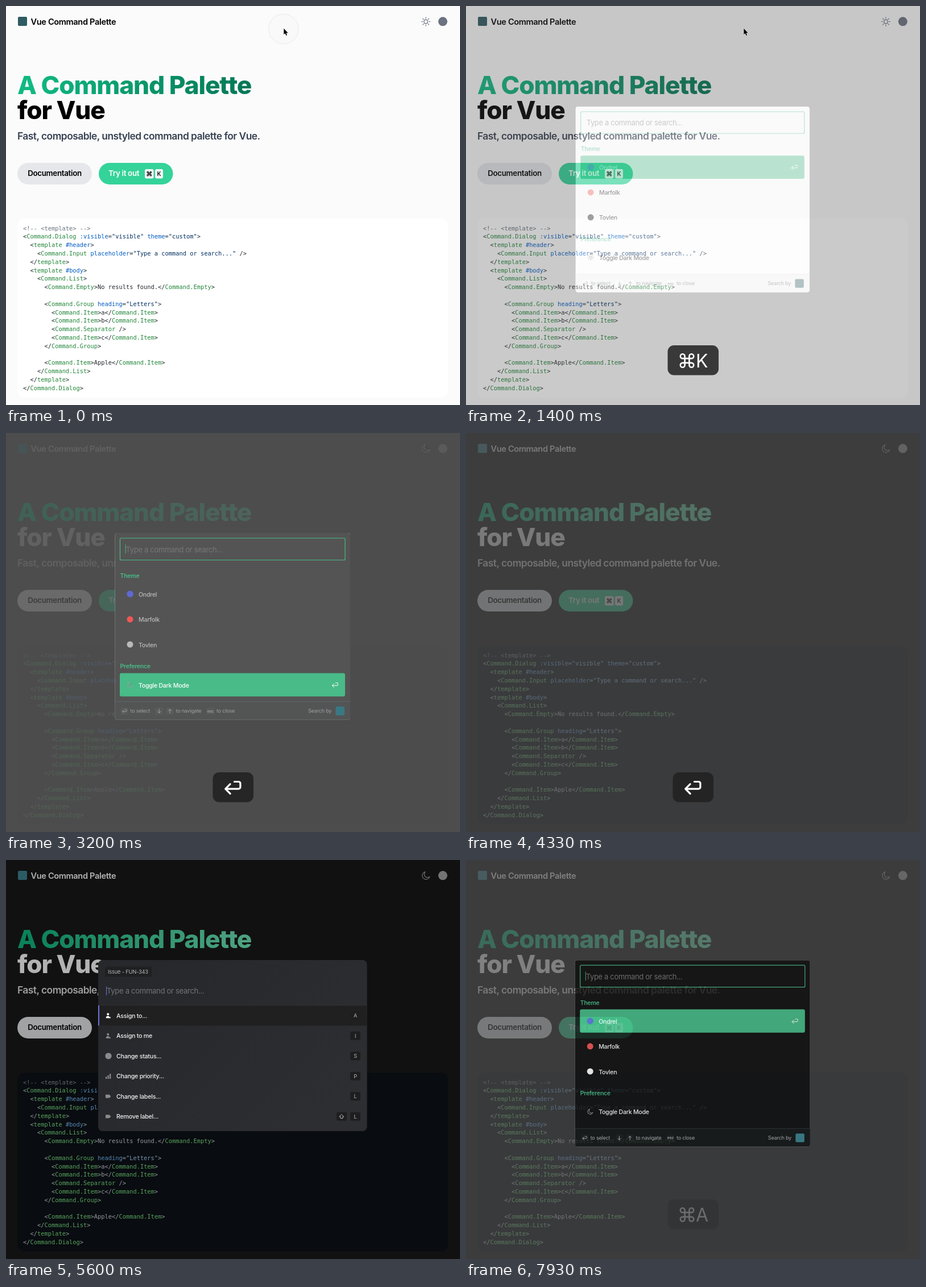
An HTML page that plays this animation: 798 by 702 pixels, repeating every 8000 ms.

```html
<!DOCTYPE html>
<html lang="en">
<head>
<meta charset="utf-8">
<title>Vue Command Palette</title>
<style>
html, body { margin: 0; width: 100%; height: 100%; overflow: hidden; }
svg { display: block; }
text { font-family: Inter, "Open Sans", sans-serif; letter-spacing: -.025em; white-space: pre; }
.code text { font: 10.37px "DejaVu Sans Mono", monospace; letter-spacing: 0; }
.light {
  --bg: #fbfbfb; --panel: #fff; --ink: #000; --sub: #374151; --icon: #6b7280; --logo: #2f5b63; --h1: url(#h1-light);
  --code: #24292e; --comment: #6a737d; --string: #032f62; --tag: #22863a; --attr: #005cc5;
  --dialog: #fafafa; --foot: #ececec; --line: #dedede; --key: #f5f5f5; --hint: #5f6368;
}
.dark {
  --bg: #181818; --panel: #0d1117; --ink: #fff; --sub: #e2e2e2; --icon: #a6a6a6; --logo: #3d8490; --h1: url(#h1-dark);
  --code: #d5dae0; --comment: #8b949e; --string: #a5d6ff; --tag: #7ee787; --attr: #79c0ff;
  --dialog: #161616; --foot: #1a1d1d; --line: #2f3a3a; --key: #1f2222; --hint: #b5b5b5;
}
</style>
</head>
<body>
<svg id="stage" width="798" height="702" viewBox="0 0 798 702"></svg>
<script>
const GREEN = '#48bb88';
const CMD = 'M6-9a3 3 0 0 0-3 3V6a3 3 0 1 0 3-3H-6a3 3 0 1 0 3 3V-6a3 3 0 1 0-3 3H6a3 3 0 1 0 0-6z';
const ENTER = 'M2-10h7a3 3 0 0 1 3 3v6a3 3 0 0 1-3 3h-22m8-8l-8 8 8 8';
const UP = 'M0 11V-11m-9 9l9-9 9 9';
const DOWN = 'M0-11V11m-9-9l9 9 9-9';
const SHIFT = 'M0-10L10 0H5v8H-5V0h-5z';
const MOON = 'M-1-7A7 7 0 1 0 7 2A6 6 0 0 1-1-7z';
const SUN = 'M3.5 0a3.5 3.5 0 1 1-7 0a3.5 3.5 0 1 1 7 0' + [...Array(8)].map((_, i) => {
  const c = Math.cos(i * Math.PI / 4), s = Math.sin(i * Math.PI / 4);
  return `M${c * 5.8} ${s * 5.8}L${c * 8} ${s * 8}`;
}).join('');

const text = (x, y, str, size, weight, fill, more = '') =>
  `<text x="${x}" y="${y}" font-size="${size}" font-weight="${weight}" fill="${fill}" ${more}>${str}</text>`;
const mid = (x, y, str, size, weight, fill) => text(x, y, str, size, weight, fill, 'text-anchor="middle"');
const rect = (x, y, w, h, r, fill, more = '') =>
  `<rect x="${x}" y="${y}" width="${w}" height="${h}" rx="${r}" fill="${fill}" ${more}/>`;
const dot = (x, y, r, fill) => `<circle cx="${x}" cy="${y}" r="${r}" fill="${fill}"/>`;
const icon = (d, x, y, scale, stroke, width) =>
  `<path d="${d}" transform="translate(${x} ${y}) scale(${scale})" fill="none" stroke="${stroke}"
    stroke-width="${width / scale}" stroke-linecap="round" stroke-linejoin="round"/>`;
const hole = (x, y, w, h, r, fill, opacity) =>
  `<path fill-rule="evenodd" fill="${fill}" fill-opacity="${opacity}" d="M-60-60H860V760H-60z
    M${x + r} ${y}h${w - 2 * r}a${r} ${r} 0 0 1 ${r} ${r}v${h - 2 * r}a${r} ${r} 0 0 1-${r} ${r}
    h${2 * r - w}a${r} ${r} 0 0 1-${r}-${r}v${2 * r - h}a${r} ${r} 0 0 1 ${r}-${r}z"/>`;

const source = `<!-- <template> -->
<Command.Dialog :visible="visible" theme="custom">
  <template #header>
    <Command.Input placeholder="Type a command or search..." />
  </template>
  <template #body>
    <Command.List>
      <Command.Empty>No results found.</Command.Empty>

      <Command.Group heading="Letters">
        <Command.Item>a</Command.Item>
        <Command.Item>b</Command.Item>
        <Command.Separator />
        <Command.Item>c</Command.Item>
      </Command.Group>

      <Command.Item>Apple</Command.Item>
    </Command.List>
  </template>
</Command.Dialog>`;

const escape = s => s.replace(/</g, '&lt;').replace(/>/g, '&gt;');
const TOKEN = /(<!--.*-->)|("[^"]*")|((?<=<\/?)[\w.]+)|((?<= )[:#]?\w+(?=[=>]))|[<>]/g;
const highlight = line => line.replace(TOKEN, (m, comment, string, tag, attr) => {
  const kind = comment ? 'comment' : string ? 'string' : tag ? 'tag' : attr ? 'attr' : 'code';
  return `<tspan fill="var(--${kind})">${escape(m)}</tspan>`;
});

const page = theme => `
  ${rect(0, 0, 798, 702, 0, 'var(--bg)')}
  ${rect(21, 19, 16, 16, 2, 'var(--logo)')}
  ${text(43.5, 32.5, 'Vue Command Palette', 14.6, 600, 'var(--ink)')}
  ${icon(theme == 'dark' ? MOON : SUN, 738, 27.5, .95, 'var(--icon)', 1.2)}
  ${dot(767.8, 27.3, 8, 'var(--icon)')}
  ${text(20, 155, 'A Command Palette', 44.2, 800, 'var(--h1)')}
  ${text(20, 199.3, 'for Vue', 44.2, 800, 'var(--ink)')}
  ${text(20, 235, 'Fast, composable, unstyled command palette for Vue.', 17.4, 600, 'var(--sub)', 'style="letter-spacing:-.03em"')}
  ${rect(20, 276, 131, 38, 19, '#e5e7eb')}
  ${mid(85.5, 299.4, 'Documentation', 13.4, 600, '#000')}
  ${rect(163, 276, 130.5, 38, 19, '#34d399')}
  ${text(180, 299.4, 'Try it out', 13.4, 600, '#fff')}
  ${rect(244, 287, 15.5, 16.5, 3, '#f7f7f7')}${icon(CMD, 251.8, 295.2, .42, '#111', 1.2)}
  ${rect(262, 287, 14, 16.5, 3, '#f7f7f7')}${mid(269, 298.8, 'K', 10, 600, '#111')}
  ${rect(20, 374, 757, 315, 13, 'var(--panel)')}
  <g class="code">${source.split('\n').map((line, i) =>
    text(30, 394.6 + i * 14.79, highlight(line), 10.37, 400, 'var(--code)')).join('')}</g>`;

const menu = (y, label, mark, name) => `
  <g data-row="${name}">${rect(200, y - 20.5, 396, 41, 3, GREEN)}${icon(ENTER, 578.5, y + .5, .4, '#fff', 1)}</g>
  ${mark}<text data-label="${name}" x="233" y="${y + 4.6}" font-size="10.6" font-weight="500" fill="var(--ink)">${label}</text>`;

const keycap = (x, d) => rect(x - 7, 483, 14, 12.5, 2, 'var(--key)') + icon(d, x, 489.3, .3, 'var(--hint)', 1);
const hint = (x, str) => text(x, 492.3, str, 9.1, 400, 'var(--hint)');

const palette = theme => `
  ${rect(191.5, 176, 413.5, 328.5, 4, 'var(--dialog)')}
  ${rect(200.5, 185, 395.5, 38.5, 2, 'none', `stroke="${GREEN}" stroke-width="1.2"`)}
  ${text(210.5, 209.5, 'Type a command or search...', 13, 400, '#787878')}
  <rect class="caret" x="209.6" y="196.5" width="1" height="15.5" fill="${GREEN}"/>
  ${text(200.5, 254.6, 'Theme', 10.5, 600, GREEN)}
  ${menu(283.2, 'Ondrel', dot(218, 283.2, 5.8, '#5e6ad2'), 'first')}
  ${menu(327.8, 'Marfolk', dot(218, 327.8, 5.5, '#f25757'), '')}
  ${menu(372, 'Tovlen', dot(218, 372, 5.5, 'var(--ink)'), '')}
  ${text(200.5, 414, 'Preference', 10.5, 600, GREEN)}
  ${menu(443, 'Toggle Dark Mode', icon(theme == 'dark' ? MOON : SUN, 218, 443, .66, 'var(--icon)', 1), 'last')}
  <path d="M191.5 472.5h413.5v28a4 4 0 0 1-4 4h-405.500a4 4 0 0 1-4-4z" fill="var(--foot)"/>
  ${rect(191.5, 472, 413.5, 1, 0, 'var(--line)')}
  ${keycap(208.5, ENTER)}${hint(218.5, 'to select')}
  ${keycap(269.3, DOWN)}${keycap(288, UP)}${hint(298.5, 'to navigate')}
  ${rect(352.5, 483, 14, 12.5, 2, 'var(--key)')}${mid(359.5, 491.5, 'esc', 7, 600, 'var(--hint)')}
  ${hint(370, 'to close')}${hint(531, 'Search by')}
  ${rect(579.5, 481.3, 15.5, 15.5, 2, 'var(--logo)')}`;

const person = (y, c) => dot(179.2, y - 2.6, 2, c) +
  `<path d="M175.800 ${y + 4.500}v-1.500a3 3 0 0 1 3-2.500h1.500l1.500 2h2v2z" fill="${c}"/>`;
const label = (y, c) => `<path d="M175 ${y - 3}h6.500l3 3-3 3H175z" fill="${c}"/>`;
const bars = (y, c) => [0, 1, 2].map(i => rect(175 + i * 3.5, y + 1 - i * 2.6, 2.3, 3.6 + i * 2.6, .5, c)).join('');
const shortcut = (x, y, str) => rect(x - 9, y - 7.6, 18, 15, 3, '#1e1e20') +
  (str == 'shift' ? icon(SHIFT, x, y + .3, .38, '#b5b5b5', 1) : mid(x, y + 3.2, str, 9.2, 400, '#b5b5b5'));

const issueRows = [
  ['Assign to...', 'A', person], ['Assign to me', 'I', person],
  ['Change status...', 'S', (y, c) => dot(180, y, 5.6, c)], ['Change priority...', 'P', bars],
  ['Change labels...', 'L', label], ['Remove label...', 'L', label]];

const issueDialog = `
  ${hole(162, 176, 472.5, 301, 8, '#000', .3)}
  ${rect(162, 176, 472.5, 301, 8, 'url(#slate)')}
  ${rect(174, 187.5, 82, 18, 3, '#1f2022')}
  ${text(179, 200, 'Issue - FUN-343', 9.4, 400, '#b4b4b6')}
  ${text(177, 235, 'Type a command or search...', 13.1, 400, '#727477')}
  <rect class="caret" x="176" y="222.500" width="1.200" height="15.500" fill="#5e6ad2"/>
  ${rect(162, 255.5, 472.5, 1, 0, '#35373a')}
  ${rect(162, 256, 472.5, 35.3, 0, '#202021')}${rect(162, 256, 2, 35.3, 0, '#6c74d8')}
  ${issueRows.map(([str, key, mark], i) => {
    const y = 273.8 + i * 35.5;
    return mark(y, i ? '#8a8a8c' : '#fff') + text(194, y + 4, str, 10.7, 500, '#f0f0f0') + shortcut(614, y, key);
  }).join('')}
  ${shortcut(590, 451.3, 'shift')}`;

const gradient = (id, from, to, box) => `<linearGradient id="${id}" gradientUnits="userSpaceOnUse" ${box}>
  <stop offset=".05" stop-color="${from}"/><stop offset=".95" stop-color="${to}"/></linearGradient>`;
const titleBox = 'x1="20" y1="0" x2="439" y2="0"';

const $ = s => document.querySelector(s);
const $$ = s => document.querySelectorAll(s);
$('#stage').innerHTML = `
  <defs>
    ${gradient('h1-light', '#10b981', '#047857', titleBox)}
    ${gradient('h1-dark', '#10b981', '#6ee7b7', titleBox)}
    ${gradient('slate', '#27282b', '#2d2e31', 'x1="240" y1="160" x2="560" y2="490"')}
  </defs>
  <g class="light">${page('light')}</g>
  <g class="dark">${page('dark')}</g>
  <g id="palette">
    ${hole(191.5, 176, 413.5, 328.5, 4, '#4b4b4b', .8)}
    <g class="light">${palette('light')}</g>
    <g class="dark">${palette('dark')}</g>
  </g>
  <rect id="veil" width="798" height="702" fill="#4b4b4b"/>
  <g id="issue">${issueDialog}</g>
  <g id="keys"></g>
  <circle id="ripple" cx="487.800" cy="40.500" r="26.300" fill="#000" fill-opacity=".008" stroke="#e9e9e9"/>
  <path id="cursor" d="M488.300 39.500v10.800l2.400-2.200 1.700 3.900 1.700-.700-1.700-3.800h3.300z" fill="#000" stroke="#fff" stroke-width=".9" paint-order="stroke"/>`;

// Pressed keys: start, fade start, fade end, label, lowest opacity
const presses = [
  [600, 870, 870, 'cmd'], [870, 1640, 2020, 'K', .08],
  [2470, 3070, 3070, 'up'], [3070, 3470, 3470, 'enter'],
  [3470, 3930, 4270, 'down'], [4270, 5250, 5600, 'enter'],
  [6730, 6870, 6870, 'cmd'], [6870, 7670, 8020, 'A']];
const glyphs = { cmd: [CMD, 1.3], up: [UP, 1.1], down: [DOWN, 1.1], enter: [ENTER, 1.05] };

function keyBox(name) {
  const glyph = glyphs[name];
  const box = glyph ? rect(363.5, 597, 71.5, 52.5, 11, '#202020', 'fill-opacity=".85"')
                    : rect(354.5, 597, 89.5, 52.5, 11, '#202020', 'fill-opacity=".85"');
  return box + (glyph ? icon(glyph[0], 399.3, 624, glyph[1], '#fff', name == 'cmd' ? 2.6 : 3.2)
    : icon(CMD, 388.5, 624, 1.3, '#fff', 2.6) + text(404, 635.7, name, 32, 400, '#fff'));
}

const ramp = (t, from, to) => Math.min(1, Math.max(0, (t - from) / (to - from)));
const fade = (list, value) => list.forEach(el => el.setAttribute('opacity', value));
const blink = (t, start) => ((t - start) % 960 + 960) % 960 < 480 ? 1 : 0;

function draw(t) {
  fade($$('.dark'), ramp(t, 3020, 3270));

  const open = t < 4300 ? ramp(t, 1270, 1630) : ramp(t, 7613, 7973);
  const scale = 1 - .01 * (1 - open);
  fade([$('#palette')], open);
  $('#palette').setAttribute('transform', `translate(398 340) scale(${scale}) translate(-398 -340)`);
  fade($$('#palette .caret'), t < 1600 ? 0 : blink(t, 1960));

  const last = ramp(t, 2440, 2600) - ramp(t, 3440, 3600);
  const shown = { first: 1 - last, last };
  $$('[data-row]').forEach(el => el.setAttribute('opacity', shown[el.dataset.row] || 0));
  $$('[data-label]').forEach(el =>
    el.setAttribute('fill', shown[el.dataset.label] > .5 ? '#fff' : 'var(--ink)'));

  fade([$('#veil')], t < 4300 ? 0 : .74 * (1 - ramp(t, 4335, 4600)));
  fade([$('#issue')], ramp(t, 4450, 4760) - ramp(t, 7590, 7700));
  fade($$('#issue .caret'), blink(t, 5270));

  const press = presses.findLast(p => t >= p[0]);
  const strength = press ? Math.max(press[4] || 0, 1 - (t < press[1] ? 0 : ramp(t, press[1], press[2] + .1))) : 0;
  $('#keys').innerHTML = strength ? keyBox(press[3]) : '';
  fade([$('#keys')], strength);

  fade([$('#ripple')], 1 - ramp(t, 40, 200));
  fade([$('#cursor')], t < 2470 ? 1 : 0);
}

function tick() {
  draw(performance.now() % 8000);
  requestAnimationFrame(tick);
}
tick();
</script>
</body>
</html>
```
